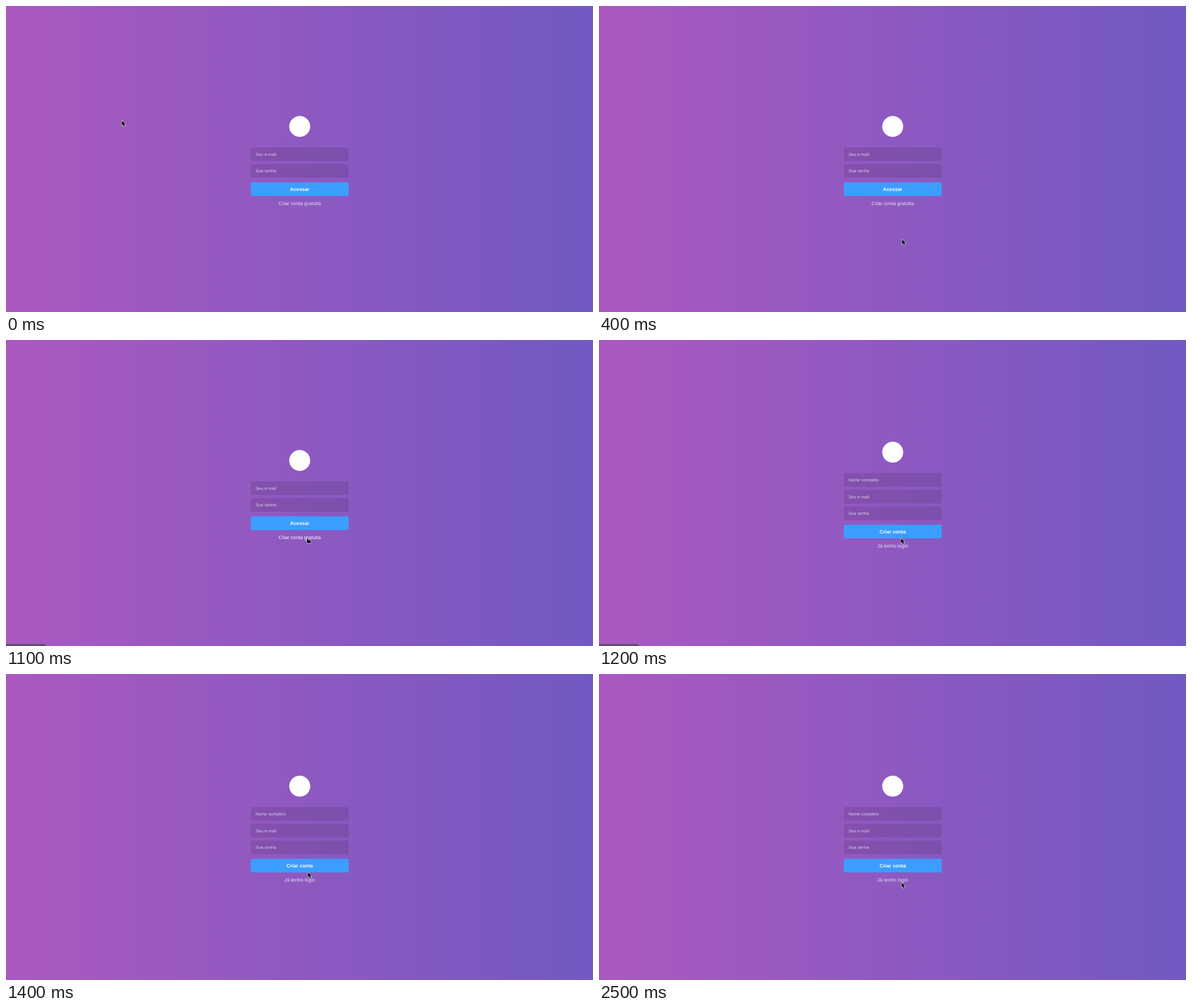
An HTML page with a canvas that plays this animation: 1035 by 541 pixels, repeating every 8 s.

```html
<!DOCTYPE html>
<html lang="pt">
<head>
<meta charset="utf-8">
<title>Login</title>
<style>
  html, body { margin: 0; width: 100%; height: 100%; overflow: hidden; background: #8e59c1; }
  canvas { display: block; }
</style>
</head>
<body>
<canvas id="stage" width="1035" height="541"></canvas>
<script>
const ctx = document.getElementById('stage').getContext('2d');
const W = 1035, H = 541, LOOP = 8000, TICK = 100;
const UNIT = 0.5475; // page zoom
const CENTER = 517.9, FORM_W = 315 * UNIT, FIELD_H = 44 * UNIT, PITCH = 54 * UNIT;
const LEFT = CENTER - FORM_W / 2;

const LOGIN = { top: 250, fields: ['Seu e-mail', 'Sua senha'], button: 'Acessar', link: 'Criar conta gratuita' };
const SIGNUP = { top: 235.3, fields: ['Nome completo', 'Seu e-mail', 'Sua senha'], button: 'Criar conta', link: 'Já tenho login' };

// Pointer keys: time, x, y
const PATH = [
  [100, 204, 202], [400, 534, 412], [500, 549, 402], [600, 550, 386],
  [700, 545, 369], [900, 532, 350], [2200, 532, 350], [2300, 536, 366], [2500, 533, 368]
];

const background = ctx.createLinearGradient(0, 0, W, 0);
background.addColorStop(0, '#ab59c1');
background.addColorStop(1, '#7159c1');

function pointerAt(t) {
  if (t <= PATH[0][0]) return PATH[0].slice(1);
  const next = PATH.findIndex(key => key[0] > t);
  if (next < 0) return PATH[PATH.length - 1].slice(1);
  const a = PATH[next - 1], b = PATH[next];
  const k = (t - a[0]) / (b[0] - a[0]);
  return [a[1] + (b[1] - a[1]) * k, a[2] + (b[2] - a[2]) * k];
}

function box(y, color) {
  ctx.fillStyle = color;
  ctx.beginPath();
  ctx.roundRect(LEFT, y, FORM_W, FIELD_H, 4 * UNIT);
  ctx.fill();
}

function label(text, x, middle, size, align, alpha, weight = '') {
  ctx.font = `${weight} ${size * UNIT}px "Liberation Sans", Arial, sans-serif`;
  ctx.textRendering = 'geometricPrecision';
  ctx.textAlign = align;
  ctx.fillStyle = `rgba(255,255,255,${alpha})`;
  ctx.fillText(text, x, middle + size * UNIT * 0.36);
}

function drawForm({ top, fields, button, link }, hover) {
  ctx.fillStyle = '#fff';
  ctx.beginPath();
  ctx.arc(CENTER, top - 37, 18.5, 0, Math.PI * 2);
  ctx.fill();

  fields.forEach((text, i) => {
    const y = top + i * PITCH;
    box(y, 'rgba(0,0,0,0.1)');
    label(text, LEFT + 15 * UNIT, y + FIELD_H / 2, 14, 'left', 0.7);
  });

  const y = top + fields.length * PITCH + 5 * UNIT;
  box(y, '#3b9eff');
  label(button, CENTER, y + FIELD_H / 2, 16, 'center', 1, 'bold');
  label(link, CENTER - 0.1, y + FIELD_H + 13.1, 16, 'center', hover ? 1 : 0.8);
}

function drawStatus(alpha) {
  ctx.fillStyle = `rgba(88,76,104,${alpha})`;
  ctx.beginPath();
  ctx.roundRect(-4, 537.6, 73.5, 8, 2);
  ctx.fill();
}

const arrow = new Path2D('M0.4 0.5V9.6L2.5 7.7L4 11.1L5.7 10.4L4.3 7.1H7.1Z');
const hand = new Path2D('M-1.2 1.2Q-0.3 0.3 0.6 1.3V3.5L4.4 3.9Q5.8 4.3 5.6 5.7L4.8 9.3H-0.2L-2.2 6.2Q-2.2 5.2 -1 5.4Z');

function drawPointer(x, y, hover) {
  const shape = hover ? hand : arrow;
  ctx.save();
  ctx.translate(x, y);
  ctx.lineJoin = 'round';
  ctx.lineWidth = 1.2;
  ctx.strokeStyle = 'rgba(255,255,255,0.85)';
  ctx.stroke(shape);
  ctx.fillStyle = '#0b0b0b';
  ctx.fill(shape);
  ctx.restore();
}

function draw(now) {
  const t = Math.floor((now % LOOP) / TICK) * TICK;
  const hover = (t >= 900 && t < 1200) || (t >= 2300 && t < 2500);
  ctx.fillStyle = background;
  ctx.fillRect(0, 0, W, H);
  drawForm(t < 1200 ? LOGIN : SIGNUP, hover);
  if (t >= 1100 && t < 1400) drawStatus(t < 1300 ? 0.95 : 0.45);
  drawPointer(...pointerAt(t), hover);
}

function frame() {
  draw(performance.now());
  requestAnimationFrame(frame);
}
frame();
</script>
</body>
</html>
```
